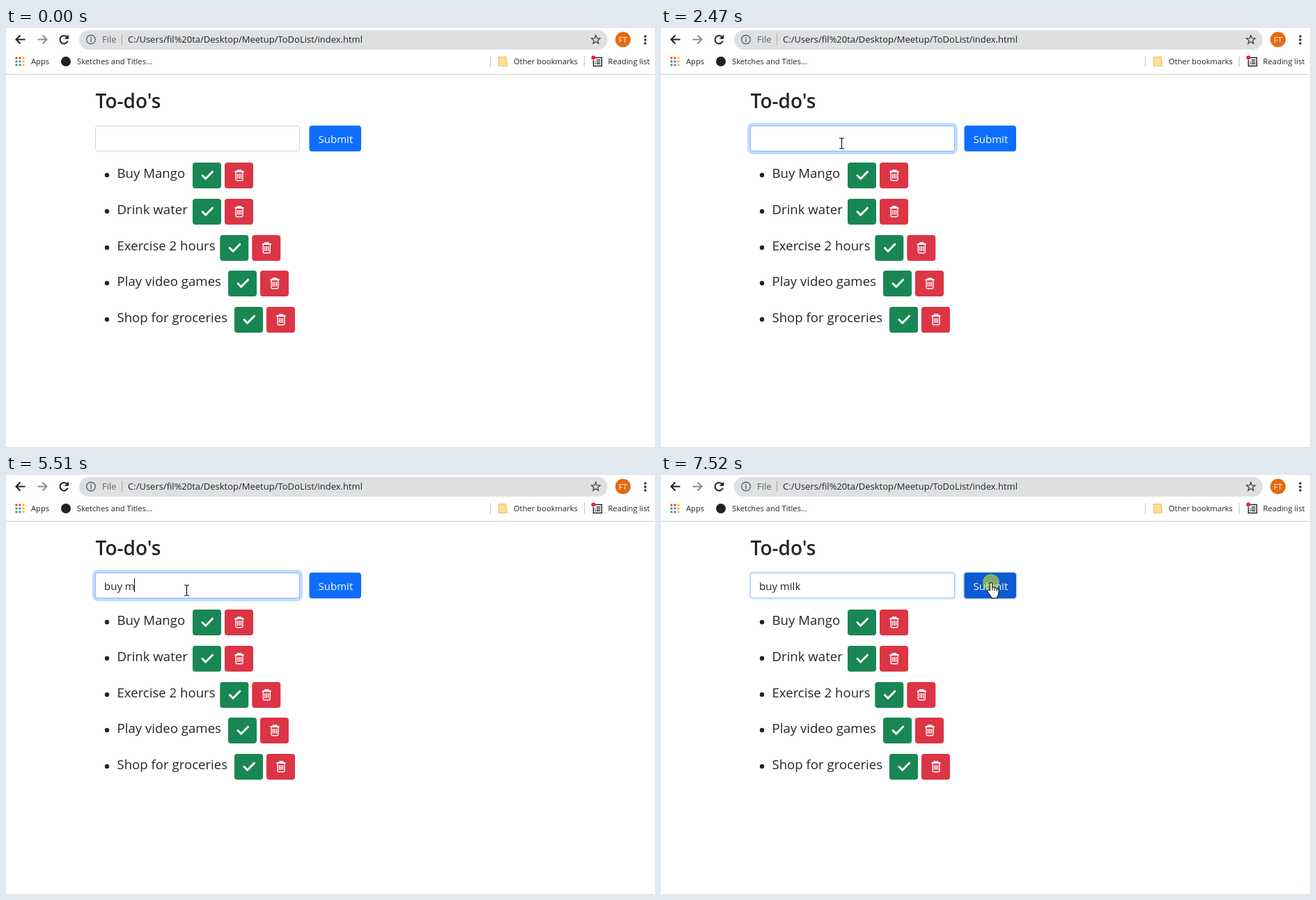
An HTML page that plays this animation: 932 by 601 pixels, repeating every 8000 ms.

```html
<!DOCTYPE html>
<html lang="en">
<head>
<meta charset="utf-8">
<title>To-do's</title>
<style>
  html, body { margin: 0; width: 100%; height: 100%; overflow: hidden; background: #fff; }
  svg { display: block; font-family: "Open Sans", "Noto Sans", sans-serif; }
  text { fill: #212529; white-space: pre; }
  .bar { font-size: 13px; }
  .bookmark { font-size: 11.2px; }
  .form { font-size: 15px; }
  .item { font-size: 18.6px; }
  .line { fill: none; stroke: #202124; stroke-width: 2; }
</style>
</head>
<body>
<svg width="932" height="601" viewBox="0 0 932 601">
  <defs>
    <g id="trash" fill="none" stroke="#fff" stroke-width="1.4">
      <path d="M-6.5-5.5H6.5M-2.5-6V-7.4H2.5V-6" stroke-width="1.8"/>
      <path d="M-5-5V5.6Q-5 7.2-3.4 7.2H3.4Q5 7.2 5 5.6V-5M-2.5-2.5V4.5M0-2.5V4.5M2.5-2.5V4.5"/>
    </g>
    <path id="arrow" d="M.5.5V15.5L4 12.3 6.3 17.5 8.6 16.5 6.3 11.5H11Z" fill="#fff" stroke="#000"/>
    <g id="beam" fill="none">
      <path d="M-3.5-7.5H-1L0-6.5 1-7.5H3.5M0-6.5V6.5M-3.5 7.5H-1L0 6.5 1 7.5H3.5" stroke="#fff" stroke-width="2.4" opacity=".6"/>
      <path d="M-3.5-7.5H-1L0-6.5 1-7.5H3.5M0-6.5V6.5M-3.5 7.5H-1L0 6.5 1 7.5H3.5" stroke="#111" stroke-width="1.2"/>
    </g>
    <g id="hand" stroke="#000" stroke-linejoin="round">
      <path d="M-1.7 2Q-1.7.5 0 .5T1.7 2V7Q4.8 6 5.2 8.2Q7.8 7.2 8.2 9.4Q11 9 11 11.5V15Q11 18 9 20V22.5H0V20L-5 13.6Q-6.4 11 -4 10.7Q-2.8 10.7-1.7 12.2Z" fill="#fff"/>
      <path d="M1.8 7V11.5M5.2 8.2V12M8.2 9.4V12.5" fill="none"/>
    </g>
  </defs>

  <!-- browser toolbar -->
  <path class="line" d="M27.5 16.5H15M20.5 10.5L14.5 16.5L20.5 22.5"/>
  <path class="line" d="M45.5 16.5H58M52.5 10.5L58.5 16.5L52.5 22.5" style="stroke:#8b8e91"/>
  <path class="line" d="M87.3 12.5A5.8 5.8 0 1 0 88.8 18.5"/>
  <path d="M90 9.5V15.8H83.7Z" fill="#202124"/>
  <rect x="105" y="3" width="759" height="28" rx="14" fill="#dfe0e1"/>
  <circle class="line" cx="122" cy="16.5" r="6.3" style="stroke:#5f6368;stroke-width:1.4"/>
  <path d="M122 12.8V14.4M122 15.6V20.2" stroke="#5f6368" stroke-width="1.5"/>
  <text class="bar" x="138" y="21" style="fill:#5f6368">File</text>
  <path d="M166.5 9V24" stroke="#a6a8ab"/>
  <text class="bar" x="175" y="21">C:/Users/fil%20ta/Desktop/Meetup/ToDoList/index.html</text>
  <path id="star" class="line" style="stroke:#3c4043;stroke-width:1.3"/>
  <circle cx="886" cy="16.5" r="11" fill="#e66a10"/>
  <text x="886" y="21" font-size="11.5" text-anchor="middle" style="fill:#fff">FT</text>
  <g fill="#202124"><circle cx="918" cy="12" r="1.7"/><circle cx="918" cy="17" r="1.7"/><circle cx="918" cy="22" r="1.7"/></g>

  <!-- bookmarks -->
  <g id="apps"></g>
  <text class="bookmark" x="36" y="52">Apps</text>
  <circle cx="86" cy="48" r="7" fill="#202124"/>
  <text class="bookmark" x="102" y="52">Sketches and Titles...</text>
  <path d="M695.5 40V56M830.5 40V56" stroke="#c4c6c8"/>
  <path d="M707.5 41.5H718.5V49.5H719.5V54.5H707.5Z" fill="#fddf93" stroke="#e9bf62"/>
  <text class="bookmark" x="729" y="52">Other bookmarks</text>
  <path class="line" d="M846 42.5H855.5V54.5H843.5V46M848 46H853.5M848 48.6H853.5M848 51.2H853.5M845.5 48.6H847M845.5 51.2H847" style="stroke-width:1.4"/>
  <circle cx="843.5" cy="42.5" r="3" fill="#e0283a"/>
  <text class="bookmark" x="864.5" y="52">Reading list</text>
  <path d="M0 66.5H932" stroke="#cdcfd1"/>

  <!-- page -->
  <text x="128.5" y="115" font-size="28" font-weight="600">To-do's</text>
  <rect id="ring" fill="#0d6efd"/>
  <rect id="input" x="128.5" y="140.5" width="293" height="36" rx="3.5" fill="#fff"/>
  <text id="typed" class="form" x="141" y="164.5"></text>
  <rect id="caret" width="1" height="20" fill="#000"/>
  <rect id="submitRing" x="434" y="138.5" width="77.5" height="40" rx="5" fill="#3184fd" opacity=".25"/>
  <rect id="submit" x="435.5" y="140" width="74.5" height="37" rx="4"/>
  <text class="form" x="448.5" y="164.5" style="fill:#fff">Submit</text>
  <g id="list"></g>

  <circle id="click" cx="474" cy="154" r="12" fill="#d4e820" opacity=".57"/>
  <use id="pointer"/>
</svg>
<script>
const $ = id => document.getElementById(id);
const set = (id, attrs) => {
  for (const name in attrs) $(id).setAttribute(name, attrs[name]);
};
const LOOP = 8000;

const starPoints = Array.from({ length: 10 }, (_, i) => {
  const radius = i % 2 ? 2.8 : 6.6, angle = i * Math.PI / 5;
  return `${847 + radius * Math.sin(angle)} ${17 - radius * Math.cos(angle)}`;
});
set("star", { d: `M${starPoints.join("L")}Z` });

const dotColors = ["#ea4335", "#ea4335", "#fbbc04", "#34a853", "#4285f4", "#fbbc04", "#34a853", "#4285f4", "#fbbc04"];
$("apps").innerHTML = dotColors.map((color, i) =>
  `<rect x="${13.5 + i % 3 * 5}" y="${41.5 + Math.floor(i / 3) * 5}" width="3" height="3" fill="${color}"/>`).join("");

// Each item: label and left edge of its first button.
const items = [["Buy Mango", 268], ["Drink water", 268], ["Exercise 2 hours", 307.3],
  ["Play video games", 319], ["Shop for groceries", 328]];
$("list").innerHTML = items.map(([label, x], i) => {
  const y = 193 + Math.round(51.8 * i);
  return `<circle cx="145" cy="${y + 18}" r="3.2" fill="#212529"/>
    <text class="item" x="159.5" y="${y + 22}">${label}</text>
    <rect x="${x}" y="${y}" width="41" height="37" rx="4" fill="#198754"/>
    <path d="M${x + 14} ${y + 18.5}l4.7 4.7l9.8-10" fill="none" stroke="#fff" stroke-width="3" stroke-linecap="round"/>
    <rect class="delete" x="${x + 46}" y="${y}" width="41" height="37" rx="4" fill="#dc3545"/>
    <use href="#trash" x="${x + 67}" y="${y + 18.5}"/>`;
}).join("");
const firstDelete = document.querySelector(".delete");

// Each step changes only the listed properties of the previous one.
const steps = [
  [0, { pointer: null, text: "", caret: false, ring: 0, submit: "#0d6efd", remove: "#dc3545", click: false }],
  [970, { pointer: ["arrow", 455, 294] }],
  [1470, { pointer: ["arrow", 265, 178] }],
  [1970, { pointer: ["beam", 259.5, 165.5], caret: true, ring: 3.5 }],
  [2470, { caret: false, ring: 4 }],
  [2970, { caret: true }],
  [3490, { caret: false }],
  [3990, { text: "buy ", caret: true }],
  [4500, { text: "buy mki" }],
  [5000, { text: "buy mk", caret: false }],
  [5510, { text: "buy m", caret: true }],
  [6010, { text: "buy milk" }],
  [6510, { pointer: ["hand", 336, 203], caret: false, remove: "#bb2d3b" }],
  [7020, { pointer: ["hand", 475, 147], caret: true, remove: "#dc3545", submit: "#0b66ec" }],
  [7520, { pointer: ["hand", 474, 154], caret: false, ring: 2, submit: "#0a5bd2", click: true }]
];

function render(time) {
  const state = Object.assign({}, ...steps.filter(([start]) => start <= time).map(step => step[1]));
  const { pointer, text, ring } = state;

  set("ring", { x: 128 - ring, y: 140 - ring, width: 294 + 2 * ring, height: 37 + 2 * ring,
    rx: 4 + ring, opacity: ring / 16 });
  set("input", { stroke: ring > 2 ? "#86b7fe" : ring ? "#9cc3fb" : "#ced4da" });
  $("typed").textContent = text;
  const textWidth = text ? $("typed").getComputedTextLength() : 0;
  set("caret", { x: 141 + Math.floor(textWidth), y: text ? 148 : 149, visibility: state.caret ? "visible" : "hidden" });
  set("submit", { fill: state.submit });
  firstDelete.setAttribute("fill", state.remove);
  for (const id of ["click", "submitRing"]) set(id, { visibility: state.click ? "visible" : "hidden" });
  set("pointer", pointer
    ? { href: "#" + pointer[0], x: pointer[1], y: pointer[2], visibility: "visible" }
    : { visibility: "hidden" });
}

const begin = performance.now();
function tick() {
  render((performance.now() - begin) % LOOP);
  requestAnimationFrame(tick);
}
tick();
</script>
</body>
</html>
```
